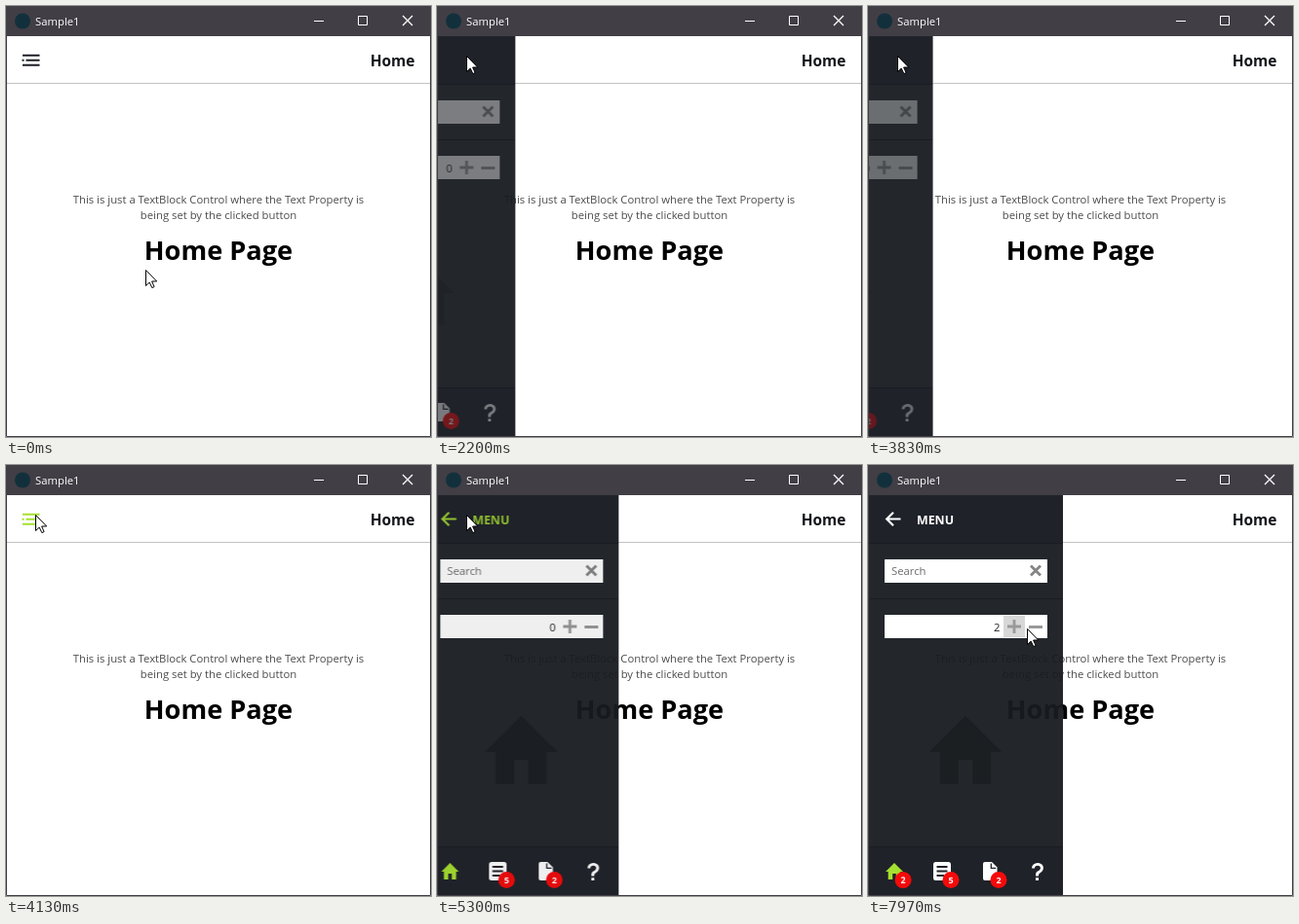
Animation of 436x443 px, one loop 8 s. Source, as an HTML page:

```html
<!DOCTYPE html>
<html lang="en">
<head>
<meta charset="utf-8">
<title>Slide-out menu</title>
<style>
  html, body { margin: 0; width: 100%; height: 100%; overflow: hidden; background: #fff; }
  svg { display: block; width: 436px; height: 443px; }
  text { font: 11.3px "Open Sans", "Noto Sans", sans-serif; white-space: pre; }
  .bold { font-weight: 700; }
  .mid { text-anchor: middle; }
  .end { text-anchor: end; }
  .line { fill: none; stroke: currentColor; }
  .badge text { font-size: 9px; font-weight: 700; fill: #fff; text-anchor: middle; }
  .badge circle { fill: #f50a0a; }

  .cursor, .panel, .content, .burger, .back, .hover, .n0, .n1, .n2, .pulse {
    animation: 8s linear infinite;
  }
  .panel, .content { animation-timing-function: cubic-bezier(.333, 1, .667, 1); }
  .burger, .back, .hover, .n0, .n1, .n2 { animation-timing-function: step-end; }
  .cursor { animation-name: move; }
  .panel { animation-name: slide; }
  .content { animation-name: fade; }
  .burger { animation-name: burger; }
  .back { animation-name: back; }
  .hover { animation-name: hover; }
  .n0 { animation-name: zero; }
  .n1 { animation-name: one; }
  .n2 { animation-name: two; }
  .pulse { animation-name: pulse; transform-origin: 36px 426px; }

  @keyframes move {
    0%, 1.24% { transform: translate(143px, 271px); }
    1.25%, 8.9% { transform: translate(142px, 271px); }
    10.5% { transform: translate(122px, 224px); }
    13% { transform: translate(62px, 108px); }
    14.5% { transform: translate(36px, 56px); }
    15.875%, 19.6% { transform: translate(29px, 40px); }
    19.625% { transform: translate(30px, 40px); }
    23.75%, 74.7% { transform: translate(30px, 51px); }
    77.2% { transform: translate(104px, 205px); }
    79.2% { transform: translate(146px, 296px); }
    80.2% { transform: translate(156px, 305px); }
    81.3% { transform: translate(165px, 285px); }
    82.875% { transform: translate(166px, 235px); }
    85%, 85.2% { transform: translate(150px, 209px); }
    87.125%, 97% { transform: translate(150px, 163px); }
    99.6%, 100% { transform: translate(163px, 168px); }
  }
  @keyframes slide {
    0%, 26.75%, 51.3%, 63.375% { transform: translateX(-200px); }
    31.6%, 46.375%, 68.26%, 100% { transform: translateX(0); }
  }
  @keyframes fade {
    0%, 26.75%, 51.3%, 63.375% { opacity: 0; }
    31.6%, 46.375%, 68.26%, 100% { opacity: 1; }
  }
  @keyframes burger { 0%, 75.6%, 100% { color: #1c1f26; } 14.4% { color: #a6e02f; } }
  @keyframes back { 0% { color: #9acd32; } 75.6%, 100% { color: #fff; } }
  @keyframes hover { 0% { opacity: 0; } 86.5%, 100% { opacity: 1; } }
  @keyframes zero { 0% { opacity: 1; } 91.25%, 100% { opacity: 0; } }
  @keyframes one { 0%, 95.25%, 100% { opacity: 0; } 91.25% { opacity: 1; } }
  @keyframes two { 0% { opacity: 0; } 95.25%, 100% { opacity: 1; } }
  @keyframes pulse {
    0%, 91.24% { transform: scale(0); }
    91.25%, 95.25% { transform: scale(1.2); animation-timing-function: ease-out; }
    94.9%, 95.24%, 99%, 100% { transform: scale(1); }
  }
</style>
</head>
<body>
<svg viewBox="0 0 436 443">
  <defs>
    <path id="house" d="M10 20V14H14V20H19V12H22L12 3L2 12H5V20Z"/>
  </defs>
  <rect width="436" height="443" fill="#fff"/>

  <!-- page -->
  <path d="M0 79.5H436" stroke="#c3c3c3"/>
  <path class="line burger" stroke-width="2" d="M17 50.8H34.5M16.5 55.8H18.5M20.5 55.8H34.5M17 60.8H34.5"/>
  <text class="bold end" x="419.5" y="62" fill="#14161b" style="font-size:15.5px">Home</text>
  <g class="mid" fill="#4c4c4c">
    <text x="218" y="203">This is just a TextBlock Control where the Text Property is</text>
    <text x="218" y="219">being set by the clicked button</text>
  </g>
  <text class="bold mid" x="218" y="261" style="font-size:27.2px">Home Page</text>

  <!-- menu -->
  <g class="panel">
    <rect x="1" y="31" width="199" height="411" fill="#181c21" opacity=".95"/>
    <path d="M1 31H200V80H1ZM1 393H200V442H1Z" fill="#1f2229"/>
    <path d="M1 80.5H200M1 137.5H200M1 392.5H200" stroke="#191c21"/>
    <g class="content">
      <g class="back">
        <path class="line" stroke-width="2.2" d="M33.5 55.5H20M26 48.7L19.2 55.5L26 62.3"/>
        <text class="bold" x="50" y="61" fill="currentColor" style="font-size:12.4px">MENU</text>
      </g>
      <path d="M17 97H184V121H17ZM17 154H184V178H17Z" fill="#fff"/>
      <text x="24" y="113" fill="#6b6b6b">Search</text>
      <path d="M167 103.5L177 113.5M177 103.5L167 113.5" stroke="#858585" stroke-width="2.8"/>
      <rect class="hover" x="139" y="155" width="22" height="22" fill="#d8d8d8"/>
      <path d="M143 166H157M150 159V173M165 166.5H179" stroke="#999" stroke-width="2.8"/>
      <g class="end" fill="#222">
        <text class="n0" x="135.5" y="171">0</text>
        <text class="n1" x="135.5" y="171">1</text>
        <text class="n2" x="135.5" y="171">2</text>
      </g>
      <use href="#house" transform="translate(55.6 245.7) scale(3.7 4.1)" fill="#1b1f22"/>

      <use href="#house" transform="translate(16.2 406) scale(.9 1)" fill="#a6e02f"/>
      <rect x="67" y="408" width="18" height="19" rx="2.5" fill="#fff"/>
      <path d="M70.5 413H81.5M70.5 417.5H81.5M70.5 422H78" stroke="#1f2229" stroke-width="2"/>
      <path d="M120 408H127L132.5 413.5V425Q132.5 427 130.5 427H120Q118 427 118 425V410Q118 408 120 408Z" fill="#fff"/>
      <path d="M126.3 409.5V414.3H131.2" fill="none" stroke="#1f2229" stroke-width="1.3"/>
      <path transform="translate(162 407.2) scale(1 .9)" fill="#fff" d="M10 19H13V22H10ZM12 2C17.4 2.2 19.7 7.6 16.5 11.7C15.7 12.7 14.3 13.3 13.7 14.2C13 15 13 16 13 17H10C10 15.3 10 13.9 10.7 12.9C11.3 11.9 12.7 11.3 13.5 10.7C15.9 8.4 15.3 5.3 12 5A3 3 0 0 0 9 8H6A6 6 0 0 1 12 2Z"/>
      <g class="badge">
        <circle cx="85" cy="426.5" r="8.5"/><text x="85" y="430">5</text>
        <circle cx="134" cy="426.5" r="8.5"/><text x="134" y="430">2</text>
        <g class="pulse">
          <circle cx="36" cy="426.5" r="8.5"/>
          <text class="n1" x="36" y="430">1</text>
          <text class="n2" x="36" y="430">2</text>
        </g>
      </g>
    </g>
  </g>

  <!-- window frame -->
  <path d="M.5 31V442.5H435.5V31" fill="none" stroke="#413e45"/>
  <rect width="436" height="31" fill="#413e45"/>
  <circle cx="17" cy="15.5" r="8" fill="#12303c"/>
  <text x="30" y="20" fill="#fff">Sample1</text>
  <path d="M316 15.5H326M361.5 10.5H370.5V19.5H361.5Z" fill="none" stroke="#fff"/>
  <path d="M407 10L417 20M417 10L407 20" stroke="#fff" stroke-width="1.3"/>

  <g class="cursor">
    <path d="M.5 .5V16.6L4.2 13.1L6.8 18.6L9.1 17.6L6.6 12H11.7Z" fill="#fff" stroke="#000"/>
  </g>
</svg>
</body>
</html>
```
